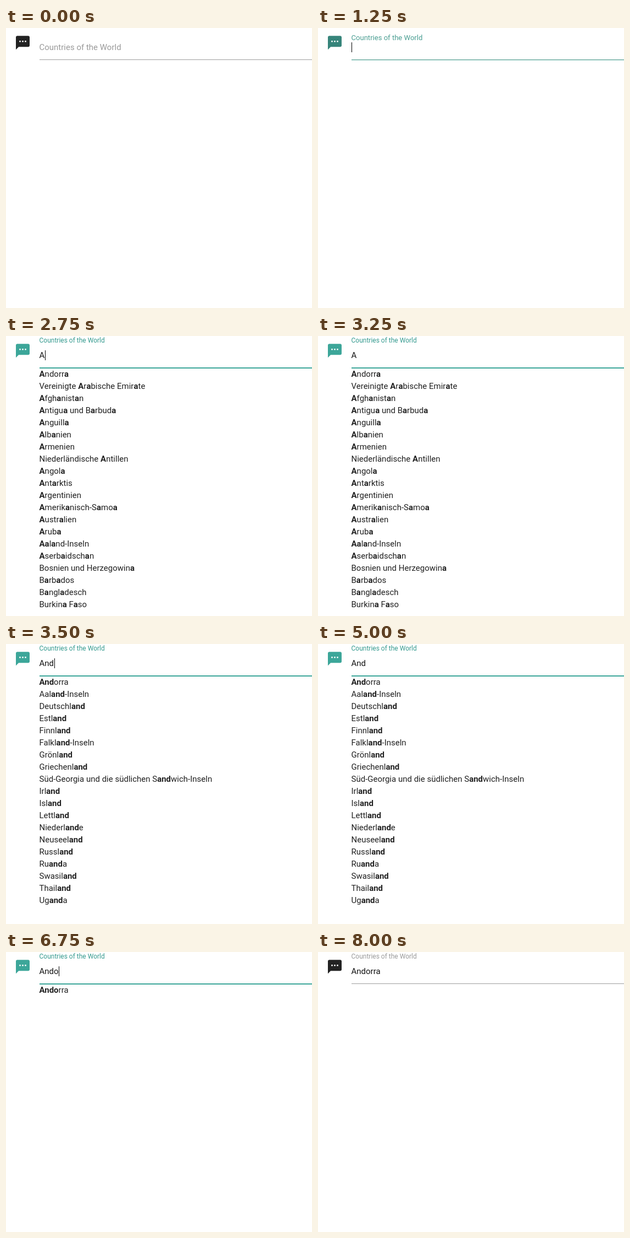
Write an HTML page that moves like this. It is 557 by 508 pixels and loops after 9.75 s.

```html
<!DOCTYPE html>
<html lang="en">
<head>
<meta charset="utf-8">
<title>Country autocomplete</title>
<style>
  html, body { margin: 0; width: 100%; height: 100%; overflow: hidden; background: #fff; }
  svg { display: block; }
  text { font: 15px Roboto, sans-serif; fill: #212121; white-space: pre; }
  .strong { font-weight: 700; }
  .input { fill: #111; }

  #icon, #label, #line, #shadow, #caret, .phase { animation: 9.75s step-end infinite; }
  #icon { animation-name: icon; }
  #label { animation-name: label; }
  #line { animation-name: line; }
  #shadow { animation-name: shadow; fill: #3ca699; }
  #caret { animation-name: caret; }
  .phase { visibility: hidden; }
  #one { animation-name: one; }
  #three { animation-name: three; }
  #four { animation-name: four; }
  #picked { animation-name: picked; }
  #result { animation-name: result; }

  @keyframes icon {
    0%, 79.48% { fill: #222; }
    12.82% { fill: #36847a; }
    15.38% { fill: #3ca699; }
    76.92% { fill: #3a9b8f; }
    100% { fill: #222; }
  }
  @keyframes label {
    0% { fill: #9a9a9a; font-size: 15px; transform: translateY(40px); }
    12.82% { fill: #4a9e92; font-size: 13.07px; transform: translateY(22px); }
    15.38% { fill: #359a8f; font-size: 12px; transform: translateY(12px); }
    76.92% { fill: #45998f; font-size: 12px; transform: translateY(12px); }
    79.48%, 100% { fill: #9a9a9a; font-size: 12px; transform: translateY(12px); }
  }
  @keyframes line {
    0%, 79.48%, 100% { fill: #9e9e9e; }
    12.82% { fill: #63a498; }
    15.38% { fill: #3ca699; }
  }
  @keyframes shadow {
    0%, 82.05%, 100% { opacity: 0; }
    12.82% { opacity: .35; }
    15.38% { opacity: 1; }
    79.48% { opacity: .03; }
  }
  /* Blinks every half second and restarts with each typed letter. */
  @keyframes caret {
    0% { opacity: 0; transform: translateX(61px); }
    12.82% { opacity: 1; transform: translateX(61px); }
    17.94% { opacity: 0; transform: translateX(61px); }
    23.07% { opacity: 1; transform: translateX(61px); }
    28.2% { opacity: 1; transform: translateX(71px); }
    33.33% { opacity: 0; transform: translateX(71px); }
    35.89%, 46.15%, 56.41%, 66.66% { opacity: 1; transform: translateX(88px); }
    41.02%, 51.28%, 61.53% { opacity: 0; transform: translateX(88px); }
    69.23% { opacity: 1; transform: translateX(96px); }
    74.35%, 100% { opacity: 0; transform: translateX(96px); }
  }
  @keyframes one { 28.2% { visibility: visible; } 35.89%, 100% { visibility: hidden; } }
  @keyframes three { 35.89% { visibility: visible; } 69.23%, 100% { visibility: hidden; } }
  @keyframes four { 69.23% { visibility: visible; } 76.92%, 100% { visibility: hidden; } }
  @keyframes picked { 76.92% { visibility: visible; } 79.48%, 100% { visibility: hidden; } }
  @keyframes result { 79.48%, 100% { visibility: visible; } }
</style>
</head>
<body>
<svg id="stage" width="557" height="508" viewBox="0 0 557 508">
  <path id="icon" transform="translate(15.5 11.7) scale(1.25)" d="M20 2H4c-1.1 0-1.99.9-1.99 2L2 22l4-4h14c1.1 0 2-.9 2-2V4c0-1.1-.9-2-2-2zM9 11H7V9h2v2zm4 0h-2V9h2v2zm4 0h-2V9h2v2z"/>
  <text id="label" x="60.5">Countries of the World</text>
  <rect id="line" x="61" y="57" width="496" height="1"/>
  <rect id="shadow" x="61" y="58" width="496" height="1"/>
  <rect id="caret" y="26" width="1" height="18"/>
</svg>
<script>
  const stage = document.getElementById('stage');
  const left = 60.5;

  function add(parent, tag, attrs, content = '') {
    const el = document.createElementNS('http://www.w3.org/2000/svg', tag);
    for (const key in attrs) el.setAttribute(key, attrs[key]);
    el.textContent = content;
    return parent.appendChild(el);
  }

  function addRow(parent, name, query, y) {
    const row = add(parent, 'text', { x: left, y });
    for (const part of name.split(new RegExp(`(${query})`, 'i'))) {
      const hit = part.toLowerCase() === query.toLowerCase();
      if (part) add(row, 'tspan', hit ? { class: 'strong' } : {}, part);
    }
  }

  function addPhase(id, typed, names) {
    const group = add(stage, 'g', { id, class: 'phase' });
    add(group, 'text', { x: left, y: 40, class: 'input' }, typed);
    names.forEach((name, i) => addRow(group, name, typed, 74 + i * 22));
  }

  addPhase('one', 'A', [
    'Andorra', 'Vereinigte Arabische Emirate', 'Afghanistan', 'Antigua und Barbuda',
    'Anguilla', 'Albanien', 'Armenien', 'Niederländische Antillen', 'Angola',
    'Antarktis', 'Argentinien', 'Amerikanisch-Samoa', 'Australien', 'Aruba',
    'Aaland-Inseln', 'Aserbaidschan', 'Bosnien und Herzegowina', 'Barbados',
    'Bangladesch', 'Burkina Faso'
  ]);
  addPhase('three', 'And', [
    'Andorra', 'Aaland-Inseln', 'Deutschland', 'Estland', 'Finnland',
    'Falkland-Inseln', 'Grönland', 'Griechenland',
    'Süd-Georgia und die südlichen Sandwich-Inseln', 'Irland', 'Island',
    'Lettland', 'Niederlande', 'Neuseeland', 'Russland', 'Ruanda', 'Swasiland',
    'Thailand', 'Uganda'
  ]);
  addPhase('four', 'Ando', ['Andorra']);
  addPhase('picked', 'Andorra', ['Andorra']);
  addPhase('result', 'Andorra', []);
</script>
</body>
</html>
```
